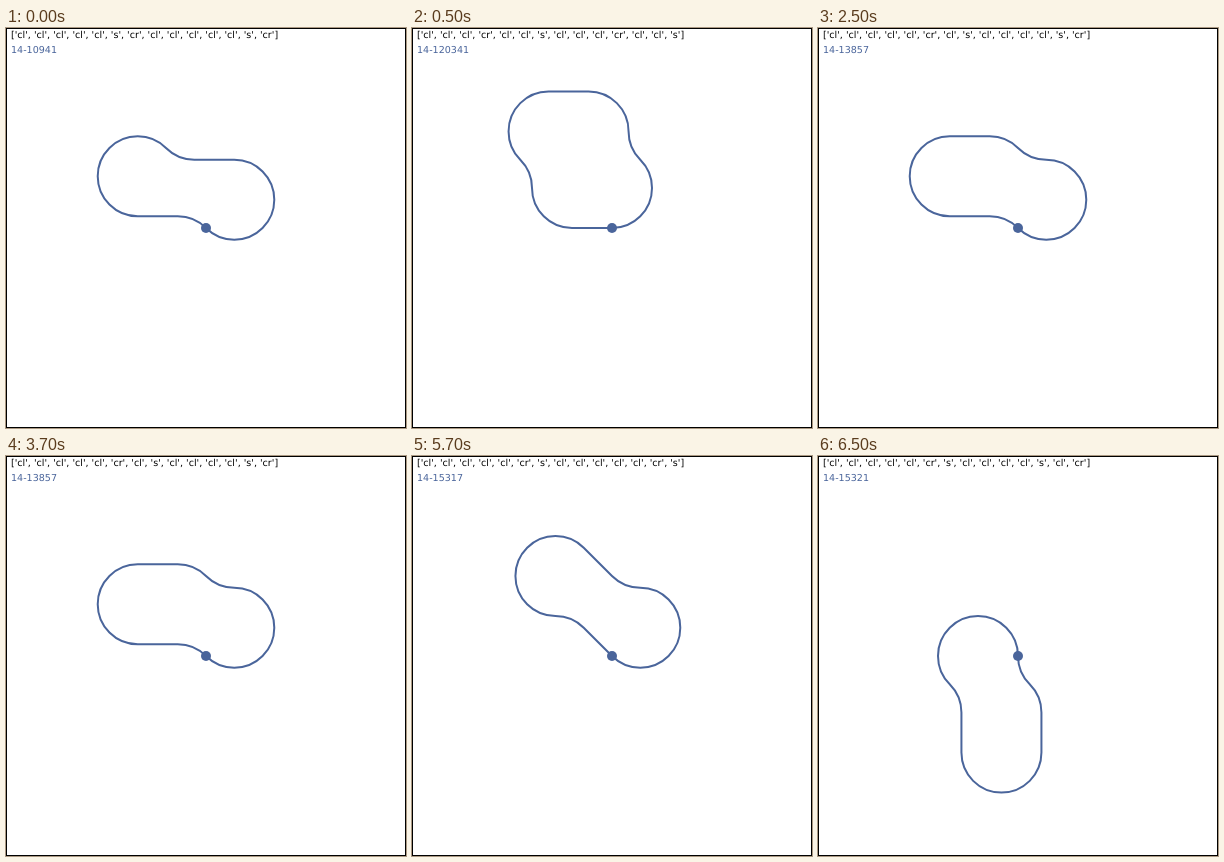
An HTML page with a canvas for the animation above (8 s loop, 400 by 400 pixels).

```html
<!DOCTYPE html>
<html lang="en">
<head>
<meta charset="utf-8">
<title>Track layouts</title>
<style>
  html, body { margin: 0; width: 100%; height: 100%; overflow: hidden; background: #fff; }
  canvas { display: block; width: 400px; height: 400px; }
</style>
</head>
<body>
<canvas id="stage" width="400" height="400"></canvas>
<script>
const SIZE = 400, UNIT = 40, TURN = Math.PI / 4, LOOP = 8000;
const INK = '#4a659b';

// heading: eighth turns, counted anticlockwise from east
const layouts = [
  { at: 0,    id: '14-10941',  heading: -1, track: 'cl cl cl cl cl s cr cl cl cl cl cl s cr' },
  { at: 500,  id: '14-120341', heading: 0,  track: 'cl cl cl cr cl cl s cl cl cl cr cl cl s' },
  { at: 2500, id: '14-13857',  heading: -1, track: 'cl cl cl cl cl cr cl s cl cl cl cl s cr' },
  { at: 4500, id: '14-15317',  heading: -1, track: 'cl cl cl cl cl cr s cl cl cl cl cl cr s' },
  { at: 6500, id: '14-15321',  heading: 2,  track: 'cl cl cl cl cl cr s cl cl cl cl s cl cr' }
];

const ctx = document.getElementById('stage').getContext('2d');

function traceTrack(pieces, heading) {
  let x = SIZE / 2, y = SIZE / 2, angle = -heading * TURN;
  ctx.beginPath();
  ctx.moveTo(x, y);
  for (const piece of pieces) {
    if (piece === 's') {
      x += UNIT * Math.cos(angle);
      y += UNIT * Math.sin(angle);
      ctx.lineTo(x, y);
      continue;
    }
    const side = piece === 'cl' ? -1 : 1;
    const normal = angle + side * Math.PI / 2;
    const cx = x + UNIT * Math.cos(normal), cy = y + UNIT * Math.sin(normal);
    const from = normal + Math.PI, to = from + side * TURN;
    ctx.arc(cx, cy, UNIT, from, to, side < 0);
    x = cx + UNIT * Math.cos(to);
    y = cy + UNIT * Math.sin(to);
    angle += side * TURN;
  }
}

function label(text, y, color) {
  ctx.fillStyle = color;
  ctx.fillText(text, 5, y);
}

function draw({ id, heading, track }) {
  const pieces = track.split(' ');
  ctx.fillStyle = '#fff';
  ctx.fillRect(0, 0, SIZE, SIZE);

  ctx.strokeStyle = '#000';
  ctx.lineWidth = 1;
  ctx.strokeRect(0.5, 0.5, SIZE - 1, SIZE - 1);

  ctx.font = '9.56px "DejaVu Sans", sans-serif';
  ctx.textRendering = 'geometricPrecision';
  label(`[${pieces.map(p => `'${p}'`).join(', ')}]`, 10, '#000');
  label(id, 25, INK);

  ctx.strokeStyle = INK;
  ctx.lineWidth = 2;
  traceTrack(pieces, heading);
  ctx.stroke();

  ctx.fillStyle = INK;
  ctx.beginPath();
  ctx.arc(SIZE / 2, SIZE / 2, 5, 0, 2 * Math.PI);
  ctx.fill();
}

const start = performance.now();
function tick() {
  const t = (performance.now() - start) % LOOP;
  draw(layouts.findLast(layout => layout.at <= t));
  requestAnimationFrame(tick);
}
tick();
</script>
</body>
</html>
```
